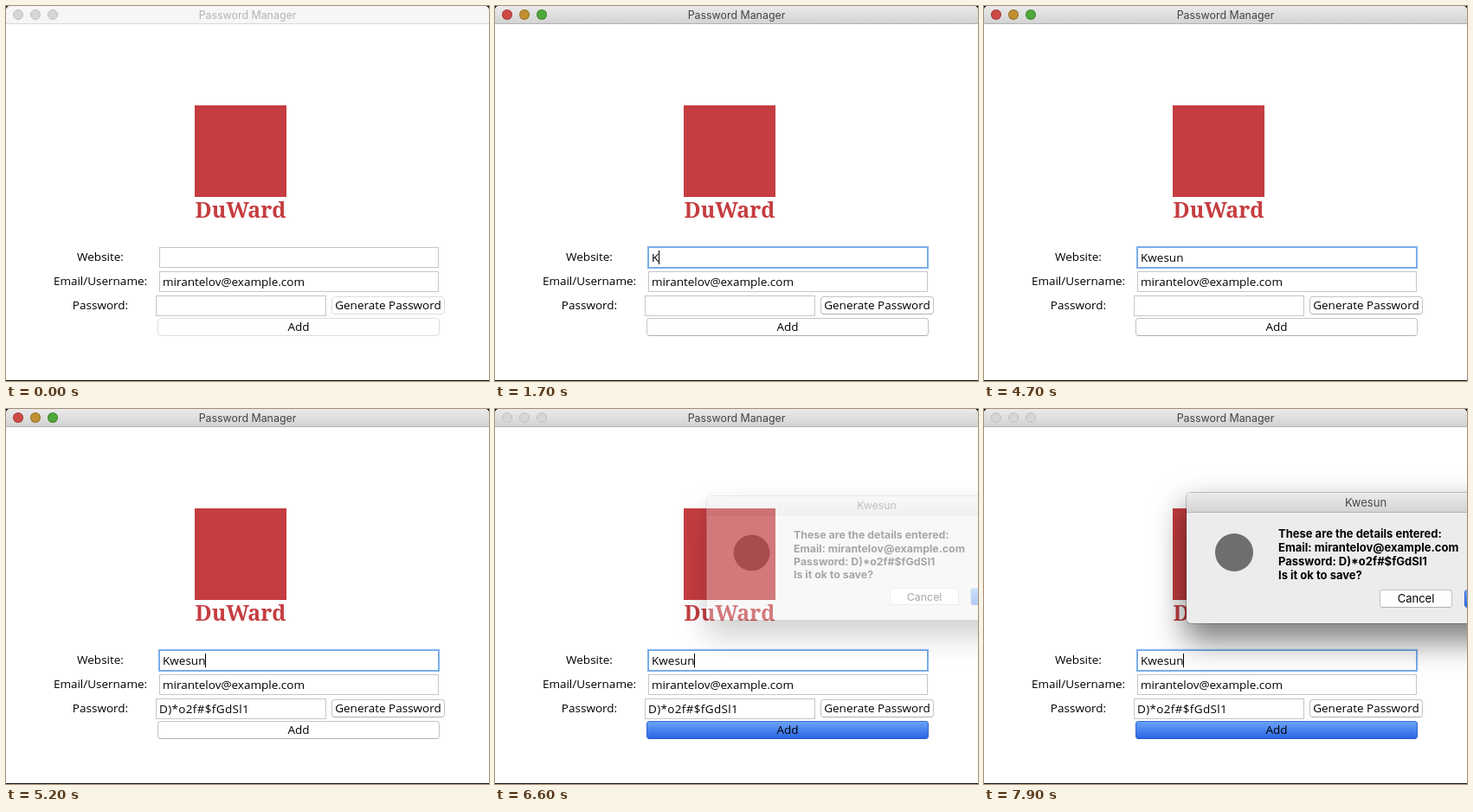
Write an HTML page that moves like this. It is 558x434 px and loops after 8 s.

```html
<!DOCTYPE html>
<html lang="en">
<head>
<meta charset="utf-8">
<title>Password Manager</title>
<style>
@property --typed { syntax: "<integer>"; inherits: true; initial-value: 0; }

html, body { margin: 0; width: 100%; height: 100%; overflow: hidden; background: #111; }
.stage {
  position: relative; width: 558px; height: 434px; overflow: hidden;
  background: #111; color: #000; font: 13.5px "Open Sans", sans-serif;
}
.stage *, .dialog * { box-sizing: border-box; }
.stage div { position: absolute; white-space: nowrap; }

/* every timed part shares the 8 s clock and changes in hard steps */
.timed { animation: 8s step-end infinite; }

.window { inset: 0 0 1px; background: #fff; border-radius: 5px 5px 0 0; overflow: hidden; }
.bar {
  left: 0; top: 0; width: 100%; height: 21px; line-height: 21px; text-align: center;
  font-family: Inter, sans-serif; font-size: 12.4px;
  color: #b4b4b4; background: #f6f6f6; border-bottom: 1px solid #d8d8d8;
}
.bar.active {
  color: #444; background: linear-gradient(#eaeaea, #d3d3d3);
  border-color: #b2b2b2; animation-name: activate;
}
.light {
  top: 4px; width: 12px; height: 12px; border-radius: 50%;
  background: #d6d6d6; border: 1px solid #bfbfbf;
}
.light.lit { border-color: #0003; animation-name: lights; }

.logo { left: 218px; top: 115px; width: 106px; height: 106px; background: #c53d40; }
.wordmark {
  left: 171px; top: 220px; width: 200px; line-height: 30px; text-align: center;
  font: bold 25px/30px "Noto Serif", serif; color: #c53d40;
}

.label { left: 39px; width: 140px; height: 24px; line-height: 24px; text-align: center; }
.entry {
  display: flex; align-items: center; height: 24px; padding-left: 3px;
  background: #fff; border: 1px solid #c6c6c6;
}
.focus {
  border-color: #6fa6e3; box-shadow: 0 0 1px 1px #8ab8ee; animation-name: activate;
}
.typing { left: 177px; top: 279px; width: 323px; border-color: transparent; background: none; }
.typing { animation-name: type; }
.typing span { font-size: calc(clamp(0, var(--typed) - var(--i), 1) * 13.5px); }
.typing i { width: 1px; height: 16px; background: #000; animation-name: blink; }
.secret { letter-spacing: .33px; animation-name: reveal; }

.button {
  height: 21px; line-height: 19px; text-align: center; background: #fff;
  border: 1px solid #c4c4c4; border-bottom-color: #b0b0b0; border-radius: 4px;
}
.window .button { animation-name: edge; }
.window .pressed, .dialog .default {
  background: linear-gradient(#6aa3f8, #2a66e4); border-color: #3a6fd6 #2f63d0 #2456c8;
}
.window .generate { animation-name: press-generate; }
.window .add { animation-name: press-add; }

.dialog {
  left: 234px; top: 97px; width: 414px; height: 151px; background: #ececec;
  border-radius: 5px; font-family: Inter, sans-serif; font-size: 13px;
  box-shadow: 0 0 0 1px #0003, 0 18px 36px 2px rgba(0, 0, 0, .52);
  transform-origin: 207px 78px; animation-name: pop;
}
.dialog .caption {
  width: 100%; height: 23px; line-height: 22px; text-align: center; color: #4a4a4a;
  background: linear-gradient(#ebebeb, #d4d4d4); border-bottom: 1px solid #b4b4b4;
  border-radius: 5px 5px 0 0;
}
.dialog .icon {
  left: 33px; top: 47px; width: 44px; height: 44px; border-radius: 50%; background: #6e6e6e;
}
.dialog .message { left: 106px; top: 39px; font-weight: 700; line-height: 16px; }
.dialog .button { top: 112px; width: 84px; }

@keyframes activate { 0% { opacity: 0 } 6.25%, 100% { opacity: 1 } }
@keyframes lights { 0% { opacity: 0 } 6.25% { opacity: 1 } 81.25%, 100% { opacity: 0 } }
@keyframes type {
  0% { --typed: 0 } 18.75% { --typed: 1 } 23.75% { --typed: 2 } 27.5% { --typed: 3 }
  38.75% { --typed: 4 } 41.25% { --typed: 5 } 46.25%, 100% { --typed: 6 }
}
@keyframes blink {
  0%, 13.75%, 25%, 36.25%, 47.5%, 58.75%, 71.25% { opacity: 0 }
  6.25%, 17.5%, 28.75%, 40%, 51.25%, 62.5%, 75%, 100% { opacity: 1 }
}
@keyframes reveal { 0% { opacity: 0 } 65%, 100% { opacity: 1 } }
@keyframes edge { 0% { border-color: #dedede } 6.25%, 100% { border-color: #c4c4c4 #c4c4c4 #b0b0b0 } }
@keyframes press-generate { 0% { opacity: 0 } 62.5% { opacity: 1 } 65%, 100% { opacity: 0 } }
@keyframes press-add { 0% { opacity: 0 } 80%, 100% { opacity: 1 } }
@keyframes pop {
  0% { opacity: 0; transform: scale(.8) }
  82.5% { opacity: .35; transform: scale(.95) }
  83.75% { opacity: .72; transform: scale(1.126) }
  85% { opacity: .93; transform: scale(1.08) }
  86.25% { opacity: 1; transform: scale(1.03) }
  87.5%, 100% { opacity: 1; transform: none }
}
</style>
</head>
<body>
<div class="stage">
  <div class="window">
    <div class="bar">Password Manager</div>
    <div class="bar active timed">Password Manager</div>
    <div class="light" style="left:8px"></div>
    <div class="light" style="left:28px"></div>
    <div class="light" style="left:48px"></div>
    <div class="light lit timed" style="left:8px;background:#cf4a45"></div>
    <div class="light lit timed" style="left:28px;background:#bf8f30"></div>
    <div class="light lit timed" style="left:48px;background:#4fa83b"></div>

    <div class="logo"></div>
    <div class="wordmark">DuWard</div>

    <div class="label" style="top:278px">Website:</div>
    <div class="label" style="top:306px">Email/Username:</div>
    <div class="label" style="top:334px">Password:</div>

    <div class="entry" style="left:177px;top:279px;width:323px"></div>
    <div class="entry focus timed" style="left:177px;top:279px;width:323px"></div>
    <div class="entry typing timed"><span style="--i:0">K</span><span style="--i:1">w</span><span style="--i:2">e</span><span style="--i:3">s</span><span style="--i:4">u</span><span style="--i:5">n</span><i class="timed"></i></div>
    <div class="entry" style="left:177px;top:307px;width:323px">mirantelov@example.com</div>
    <div class="entry" style="left:173px;top:335px;width:197px"><span class="secret timed">D)*o2f#$fGdSl1</span></div>

    <div class="button timed" style="left:376px;top:336px;width:131px">Generate Password</div>
    <div class="button pressed generate timed" style="left:376px;top:336px;width:131px">Generate Password</div>
    <div class="button timed" style="left:175px;top:361px;width:326px">Add</div>
    <div class="button pressed add timed" style="left:175px;top:361px;width:326px">Add</div>
  </div>

  <div class="dialog timed">
    <div class="caption">Kwesun</div>
    <div class="icon"></div>
    <div class="message">These are the details entered:<br>Email: mirantelov@example.com<br>Password: D)*o2f#$fGdSl1<br>Is it ok to save?</div>
    <div class="button" style="left:223px">Cancel</div>
    <div class="button default" style="left:321px;color:#fff">OK</div>
  </div>
</div>
</body>
</html>
```
